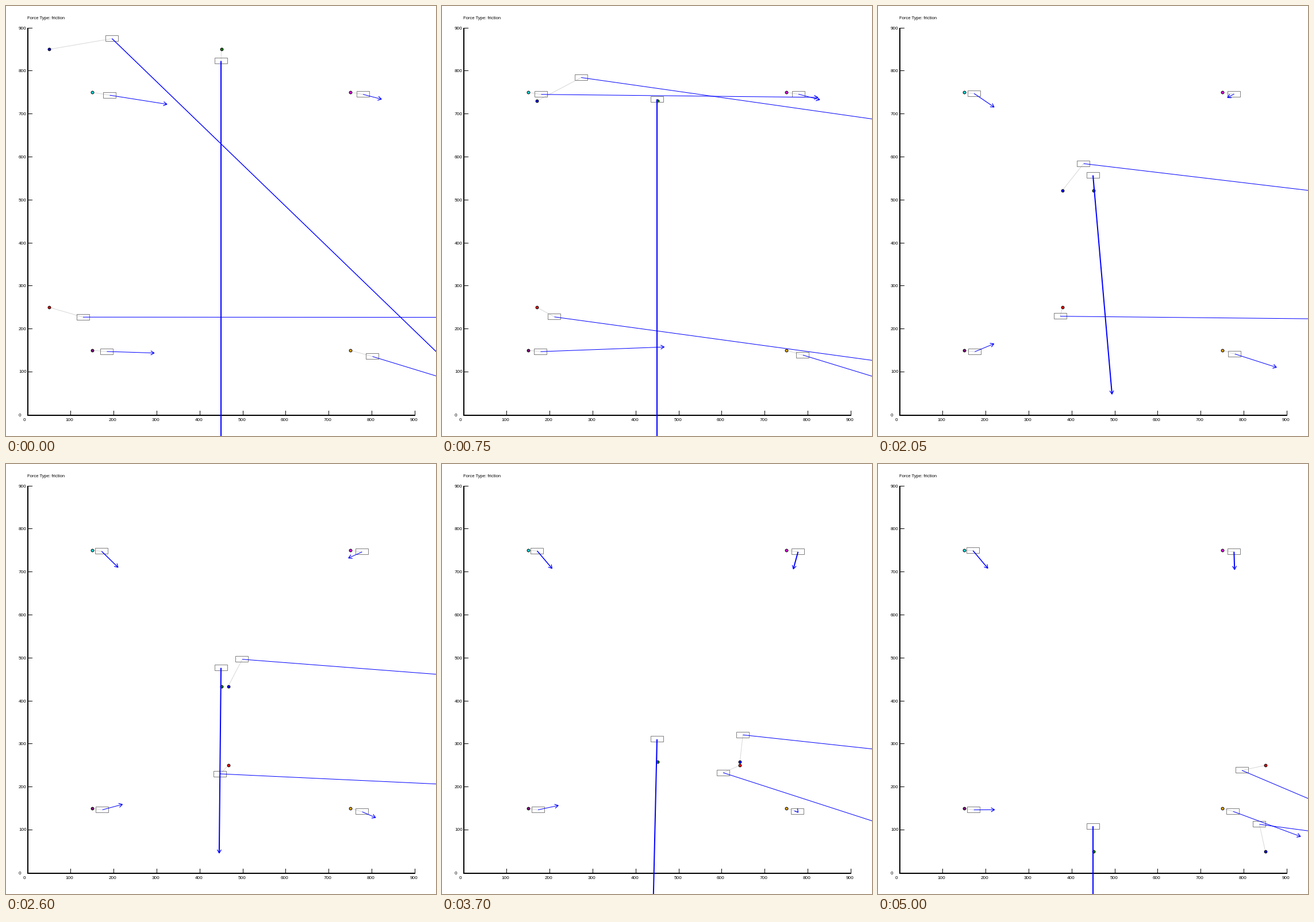
Animation of 748x748 px, one loop 5.05 s. Source, as a matplotlib script:

```python
import numpy as np
import matplotlib.pyplot as plt
from matplotlib.animation import FuncAnimation
from matplotlib.patches import Rectangle

SIZE, DPI = 748, 64
PT = 72 / DPI              # points per pixel
FRAMES, STEP = 101, 50
SCALE = 0.748
BOX_W, BOX_H = 22, 10
HEAD, SPREAD = 7, np.radians(30)

plt.rcParams["font.family"] = "Liberation Sans"
fig = plt.figure(figsize=(SIZE / DPI, SIZE / DPI), dpi=DPI, facecolor="white")
ax = fig.add_axes([0, 0, 1, 1])
ax.set(xlim=(0, SIZE), ylim=(SIZE, 0))
ax.axis("off")


def to_px(x, y):
    return np.array([38 + x * SCALE, 711.2 - y * SCALE])


def crisp(v):
    """Middle of the pixel that holds v."""
    return np.floor(v) + 0.5


def line(xs, ys, color, width, z=1):
    return ax.plot(xs, ys, color=color, lw=width * PT, zorder=z, snap=False,
                   solid_capstyle="butt", solid_joinstyle="miter")[0]


def draw_axes():
    x0, y0, x1, y1 = 38, 712, 712, 38
    line([x0, x0], [y1, y0 + 1], "black", 2)
    line([x0 - 1, x1], [y0, y0], "black", 2)
    for v in range(0, 901, 100):
        x, y = crisp(to_px(v, v))
        line([x0, x0 + 8], [y, y], "black", 1)
        line([x, x], [y0 - 8, y0], "black", 1)
        ax.text(x - 8.7, 719, str(v), size=8.1 * PT, va="center_baseline")
        ax.text(22, y - 0.5, str(v), size=8.1 * PT, va="center_baseline")
    ax.text(37.5, 22.6, "Force Type: friction", size=7.65 * PT, va="baseline")


def settle(n, start, end, tau):
    """Exponential approach from start to end, per axis."""
    start, end, tau = map(np.array, (start, end, tau))
    return end + (start - end) * np.exp(-n / tau)


def swing(n, rest, *pulses):
    """Resting value plus bell-shaped pulses (height, centre, width)."""
    return rest + sum(h * np.exp(-((n - c) / w) ** 2) for h, c, w in pulses)


class Body:
    """A dot, the box it drags, and the force arrow (degrees, pixels)."""

    def __init__(self, color, start, move, offset, heading, reach):
        self.start, self.move = np.array(start), np.array(move)
        self.offset, self.heading, self.reach = offset, heading, reach
        self.link = line([], [], "lightgray", 0.9, 2)
        self.dot = ax.plot([], [], "o", mfc=color, mec="black", mew=PT,
                           ms=4.8 * PT, zorder=3, snap=False)[0]
        self.box = ax.add_patch(Rectangle((0, 0), BOX_W, BOX_H, fill=False,
                                          ec="gray", lw=PT, zorder=4, snap=False))
        self.shaft = line([], [], "blue", 1, 5)
        self.head = line([], [], "blue", 1.2, 5)

    def update(self, n):
        dot = to_px(*(self.start + self.move * n))
        box = dot + settle(n, *self.offset)
        a = np.radians(swing(n, *self.heading))
        tip = box + swing(n, *self.reach) * np.array([np.cos(a), np.sin(a)])
        wings = [tip - HEAD * np.array([np.cos(a + s), np.sin(a + s)])
                 for s in (-SPREAD, SPREAD)]
        self.link.set_data(*zip(dot, box))
        self.dot.set_data(*zip(dot))
        self.box.set_xy(crisp(box - (BOX_W / 2, BOX_H / 2)))
        self.shaft.set_data(*zip(box, tip))
        self.shaft.set_linewidth(max(1, 2 * abs(np.sin(a))) * PT)
        self.head.set_data(*zip(wings[0], tip, wings[1]))


draw_axes()
bodies = [
    Body("blue", (50, 850), (8, -8),
         offset=[(109, -18.7), (-40, -47), (62, 10)],
         heading=[7, (37, 0, 8), (-6, 63, 12), (6, 85, 10)],
         reach=[1000]),
    Body("green", (450, 850), (0, -8),
         offset=[(-0.6, 20.3), (-0.6, -48), (36, 36)],
         heading=[90, (-5, 41, 8), (4.4, 63, 10)],
         reach=[300, (700, 0, 28)]),
    Body("red", (50, 250), (8, 0),
         offset=[(58.6, 17), (-60, 18), (55, -45)],
         heading=[0, (8, 14, 6), (27, 90, 25)],
         reach=[1000]),
    Body("cyan", (150, 750), (0, 0),
         offset=[(30.3, 5), (15, 0), (20, 45)],
         heading=[50, (-50, 12, 27)],
         reach=[40, (442, 15.5, 11)]),
    Body("magenta", (750, 750), (0, 0),
         offset=[(22, 3.5), (20.3, 2.3), (20, 50)],
         heading=[88, (-108, 8, 13), (70, 48, 22)],
         reach=[31, (-30, 28, 18), (32, 11, 8)]),
    Body("purple", (150, 150), (0, 0),
         offset=[(25.3, 2), (16.4, 2.7), (25, 40)],
         heading=[2, (-36, 31, 10), (-18, 60, 28)],
         reach=[36, (196, 12, 10)]),
    Body("orange", (750, 150), (0, 0),
         offset=[(38.5, 10.7), (18.5, 5.3), (23, 25)],
         heading=[17, (35, 74, 17)],
         reach=[1, (260, 12, 26), (124, 100, 8)]),
]


def update(n):
    for body in bodies:
        body.update(n)
    return []


anim = FuncAnimation(fig, update, frames=FRAMES, interval=STEP,
                     init_func=lambda: update(0), repeat=True, repeat_delay=0)
plt.show()
```
